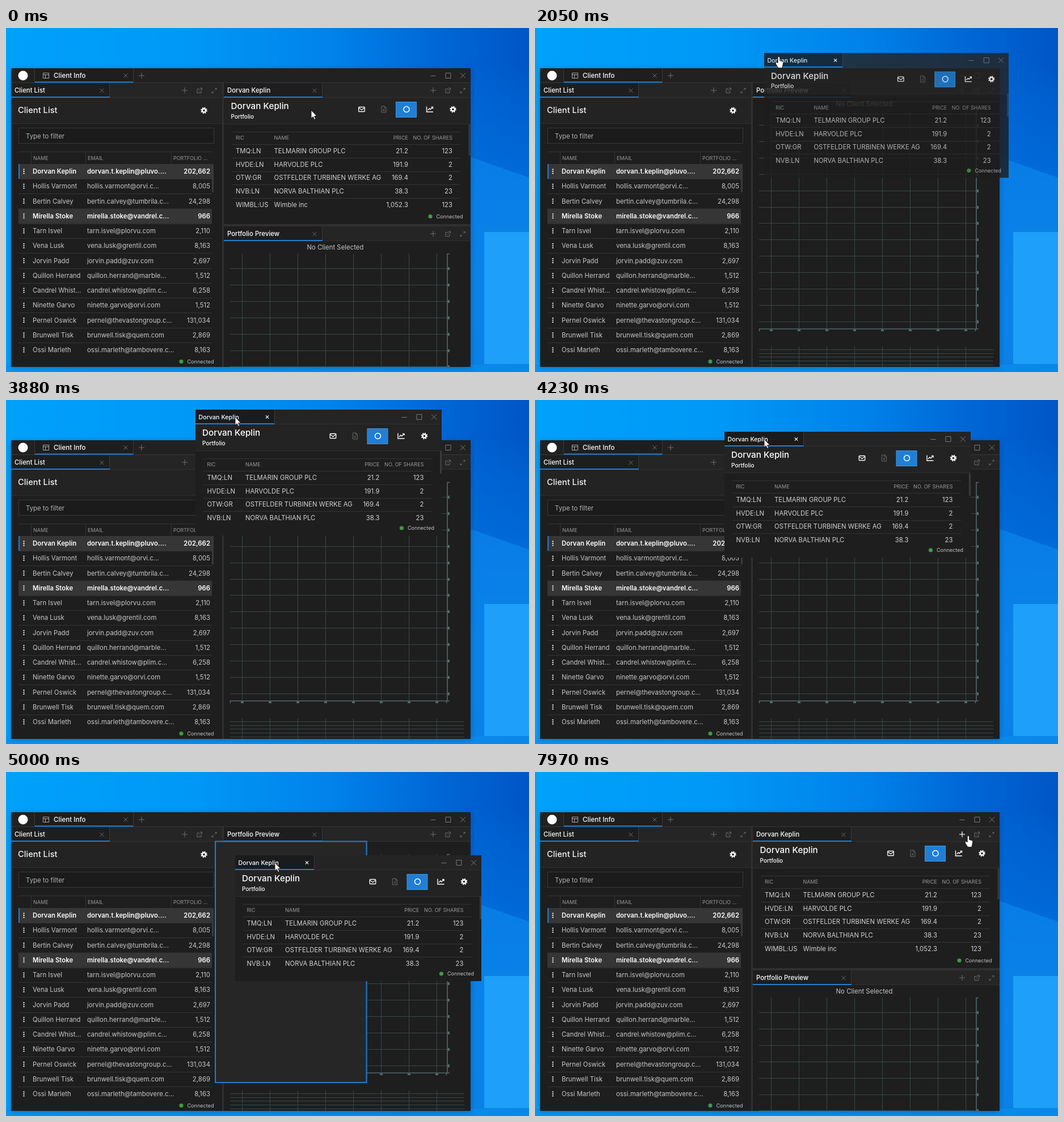
An HTML page that plays this animation: 922x607 px, repeating every 8 s.

```html
<!DOCTYPE html>
<html lang="en">
<head>
<meta charset="utf-8">
<title>Client desk</title>
<style>
  html, body { margin: 0; width: 100%; height: 100%; overflow: hidden; background: #0a84e4; }
  svg { display: block; width: 100vw; height: 100vh; }
  text { font-family: Inter, "Open Sans", sans-serif; letter-spacing: .05px; white-space: pre; }
</style>
</head>
<body>
<svg id="stage" viewBox="0 0 922 607" preserveAspectRatio="none"></svg>
<script>
const LOOP = 8000;
const BLUE = '#1f7fd6', BASE = '#1e1e1e', RAISED = '#232323', LINE = '#343434', DIM = '#6c6c6c';

const rect = (x, y, w, h, fill, extra = '') =>
  `<rect x="${x}" y="${y}" width="${w}" height="${h}" fill="${fill}" ${extra}/>`;
const path = (d, stroke, w = 1, extra = '') =>
  `<path d="${d}" fill="none" stroke="${stroke}" stroke-width="${w}" ${extra}/>`;
const hline = (x1, x2, y, color = LINE) => rect(x1, y, x2 - x1, 1, color);
const vline = (x, y1, y2, color = LINE) => rect(x, y1, 1, y2 - y1, color);
// y is the middle of the capitals
const text = (x, y, s, size = 11.3, fill = '#d2d2d2', weight = 400, anchor = 'start') =>
  `<text x="${x}" y="${(y + size * .36).toFixed(2)}" font-size="${size}" fill="${fill}" font-weight="${weight}" text-anchor="${anchor}">${s}</text>`;
const at = (x, y, s, extra = '') => `<g transform="translate(${x} ${y})" ${extra}>${s}</g>`;

// small icons, centred on the given point
const cross = (x, y, c = DIM, r = 3.5, w = 1) => at(x, y, path(`M${-r} ${-r}L${r} ${r}M${r} ${-r}L${-r} ${r}`, c, w));
const plus = (x, y, c = DIM, extra = '') => at(x, y, path('M-5 0H5M0 -5V5', c, 1.1), extra);
const popout = (x, y) => at(x, y, path('M0 -3H-4V4H3V0M-1 1L4 -4M1 -4.5H4.5V-1', DIM));
const expand = (x, y) => at(x, y, path('M1 -1L4 -4M1.5 -4H4V-1.5M-1 1L-4 4M-4 1.5V4H-1.5', DIM));
const winButtons = (x, y) => path(`M${x - 4.5} ${y + .5}h9M${x + 22} ${y - 4.5}h9v9h-9Z`, '#7a7a7a') + cross(x + 52.5, y, '#7a7a7a', 4.5);
const gear = (x, y) => at(x, y,
  '<circle r="3.1" fill="none" stroke="#fff" stroke-width="2.5"/>' +
  '<circle r="4.8" fill="none" stroke="#fff" stroke-width="1.9" stroke-dasharray="2 1.77"/>');
const mail = (x, y) => at(x, y,
  '<rect x="-5.3" y="-4" width="10.6" height="8" rx="1" fill="none" stroke="#fff" stroke-width="1.3"/>' + path('M-5 -2.5L0 1L5 -2.5', '#fff', 1.2));
const sheet = (x, y) => at(x, y, path('M-4 -5.5H1.5L4 -3V5.5H-4ZM1 -5.5V-2.5H4M-1.8 -.5L1.8 3.5M1.8 -.5L-1.8 3.5', '#666'));
const chart = (x, y) => at(x, y, path('M-5.5 -5V4.5H6M-3.5 1.5L-.5 -1.5L1.2 .2L5 -3.5M2.5 -4H5.5V-1', '#fff', 1.4));
const connected = (x, y) => `<circle cx="${x}" cy="${y}" r="3.6" fill="#3f9a42"/>` + text(x + 10.5, y, 'Connected', 9, '#c4c4c4');

const CLIENT = 'Dorvan Keplin';
const clients = [
  [CLIENT, 'dorvan.t.keplin@pluvo....', '202,662'],
  ['Hollis Varmont', 'hollis.varmont@orvi.c...', '8,005'],
  ['Bertin Calvey', 'bertin.calvey@tumbrila.c...', '24,298'],
  ['Mirella Stoke', 'mirella.stoke@vandrel.c...', '966'],
  ['Tarn Isvel', 'tarn.isvel@plorvu.com', '2,110'],
  ['Vena Lusk', 'vena.lusk@grentil.com', '8,163'],
  ['Jorvin Padd', 'jorvin.padd@zuv.com', '2,697'],
  ['Quillon Herrand', 'quillon.herrand@marble...', '1,512'],
  ['Candrel Whist...', 'candrel.whistow@plim.c...', '6,258'],
  ['Ninette Garvo', 'ninette.garvo@orvi.com', '1,512'],
  ['Pernel Oswick', 'pernel@thevastongroup.c...', '131,034'],
  ['Brunwell Tisk', 'brunwell.tisk@quem.com', '2,869'],
  ['Ossi Marleth', 'ossi.marleth@tambovere.c...', '8,163']
];
const holdings = [
  ['TMQ:LN', 'TELMARIN GROUP PLC', '21.2', '123'],
  ['HVDE:LN', 'HARVOLDE PLC', '191.9', '2'],
  ['OTW:GR', 'OSTFELDER TURBINEN WERKE AG', '169.4', '2'],
  ['NVB:LN', 'NORVA BALTHIAN PLC', '38.3', '23'],
  ['WIMBL:US', 'Wimble inc', '1,052.3', '123']
];

function desktop() {
  const stops = list => list.map(([o, c]) => `<stop offset="${o}" stop-color="${c}"/>`).join('');
  return `<defs>
    <linearGradient id="sky" x1="0" y1="0" x2="1" y2="0">${stops([[0, '#00a1fb'], [.35, '#0098f6'], [.62, '#0083ea'], [.85, '#0064d3'], [1, '#0056c6']])}</linearGradient>
    <linearGradient id="floor" x1="0" y1="0" x2="0" y2="1">${stops([[0, '#0078e0'], [.4, '#006fdc'], [.75, '#0a86ea'], [1, '#0a7ee0']])}</linearGradient>
    <linearGradient id="strip" x1="0" y1="0" x2="1" y2="0">${stops([[0, '#0a95f3'], [1, '#0a88ea']])}</linearGradient>
    <linearGradient id="fade" x1="0" y1="0" x2="0" y2="1"><stop offset=".1" stop-color="#fff" stop-opacity="0"/><stop offset=".5" stop-color="#fff"/></linearGradient>
    <mask id="low"><rect width="922" height="607" fill="url(#fade)"/></mask>
    <filter id="soft" x="-10%" y="-10%" width="120%" height="120%"><feGaussianBlur stdDeviation="5"/></filter>
    <clipPath id="mainClip"><rect x="9" y="71" width="810" height="527"/></clipPath>
    <clipPath id="floatClip"><rect width="434" height="222"/></clipPath>
  </defs>` +
    rect(0, 0, 922, 607, 'url(#sky)') +
    rect(780, 0, 142, 607, 'url(#floor)', 'mask="url(#low)"') +
    '<path d="M780 214L922 264V607H780Z" fill="#0a82e9" opacity=".8"/>' +
    rect(0, 594, 922, 13, 'url(#strip)') +
    rect(843, 360, 240, 233, '#1d9ffa') +
    rect(9, 73, 810, 526, '#00254d', 'opacity=".38" filter="url(#soft)"');
}

function panelHead(x, y, w, title, iconX, closeX) {
  return rect(x, y, w, 26, '#252525') + rect(x, y, 174, 26, BASE) +
    vline(x + 173, y, y + 26, '#3a3a3a') + hline(x, x + w, y + 25, '#303030') +
    rect(x, y + 24, 174, 2, BLUE) + text(x + 6, y + 13, title, 11.3, '#fff', 500) +
    cross(closeX, y + 13.5) + plus(iconX, y + 13) + popout(iconX + 26, y + 13.5) + expand(iconX + 52, y + 13.5);
}

function frame() {
  return rect(9, 71, 810, 527, BASE) + rect(9, 71, 810, 26, '#212121') +
    rect(51, 71, 173, 26, BASE) + vline(50, 71, 97, '#3a3a3a') + vline(224, 71, 97, '#3a3a3a') +
    hline(9, 819, 96, '#383838') + rect(51, 94.5, 173, 2, BLUE) +
    '<circle cx="30" cy="84" r="8.5" fill="#fff"/>' +
    path('M65.5 79.5h10v9h-10ZM65.5 82.5h10M69.5 82.5v6', '#aaa') +
    text(84, 84, 'Client Info', 11.5, '#fff', 500) + cross(211, 84) + plus(239, 84) + winButtons(753, 84);
}

function clientList() {
  let s = panelHead(9, 97, 372, 'Client List', 315, 169) +
    rect(9, 123, 372, 45, RAISED) + hline(9, 381, 168, '#303030') +
    text(21, 145, 'Client List', 14.6, '#f4f4f4', 500) + gear(349, 145.5) +
    rect(22.5, 176.5, 344, 27, '#1b1b1b', 'stroke="#383838"') + text(35, 190.5, 'Type to filter', 11.3, '#b4b4b4') +
    hline(22, 364, 218) + hline(22, 364, 240);
  [44, 140, 291].forEach(x => s += vline(x, 219, 240));
  s += text(48, 229.5, 'NAME', 9, '#999') + text(144, 229.5, 'EMAIL', 9, '#999') + text(295, 229.5, 'PORTFOLIO ...', 8.8, '#999');
  clients.forEach(([name, mailTo, sum], i) => {
    const y = 253 + i * 26.25, strong = i === 0 || i === 3;
    const c = strong ? '#fff' : '#c9c9c9', w = strong ? 600 : 400;
    if (strong) s += rect(22, y - 13, 341, 26, '#363636');
    if (i < 12) s += hline(22, 363, Math.round(y + 13));
    if (!i) s += rect(22, 240, 2, 26, BLUE);
    [-3.5, 0, 3.5].forEach(d => s += rect(30.5, y + d - 1, 2, 2, '#fff'));
    s += text(47, y, name, 11.3, c, w) + text(143, y, mailTo, 11.3, c, w) + text(360, y, sum, 11.3, c, w, 'end');
  });
  return s + rect(363, 240, 3, 50, '#3a3a3a') + connected(309, 588.5) + rect(381, 97, 3, 501, '#303030');
}

// shared by the docked panel and the floating window
function portfolio(h, rows, barH) {
  let s = rect(0, 26, 434, h - 26, BASE) + rect(0, 26, 434, 46, RAISED) + hline(0, 434, 72, '#303030') +
    text(12, 41, CLIENT, 15.2, '#fff', 500) + text(12, 59, 'Portfolio', 10, '#fff', 500) +
    mail(242.5, 46.5) + sheet(281.5, 46.5) + rect(303, 33.5, 36, 27, BLUE, 'stroke="#4795da"') +
    '<circle cx="321.5" cy="46.5" r="5" fill="none" stroke="#fff" stroke-width="1.5"/>' +
    chart(362.5, 46.5) + gear(403.5, 46.5) + hline(14, 417, 86) + hline(14, 417, 108) +
    text(20.5, 97, 'RIC', 9, '#999') + text(88, 97, 'NAME', 9, '#999') +
    text(324.5, 97, 'PRICE', 9, '#999', 400, 'end') + text(402.5, 97, 'NO. OF SHARES', 9, '#999', 400, 'end');
  holdings.slice(0, rows).forEach(([ric, name, price, n], i) => {
    const y = 120 + i * 23.7;
    s += text(20.5, y, ric) + text(88, y, name) +
      text(324.5, y, price, 11.3, '#d2d2d2', 400, 'end') + text(402.5, y, n, 11.3, '#d2d2d2', 400, 'end');
    if (i < rows - 1) s += hline(14, 417, Math.round(y + 12));
  });
  return s + rect(431, 73, 3, barH, '#3a3a3a') + connected(363.5, h === 222 ? 209 : 235.5);
}

function preview() {
  const grid = '#394747', axis = '#52686c';
  const cols = Array.from({ length: 8 }, (_, i) => 416 + i * 49);
  const rows = Array.from({ length: 13 }, (_, i) => Math.round(424 + i * 28.9));
  let s = rect(384, 350, 435, 501, BASE) + panelHead(384, 350, 435, 'Portfolio Preview', 753, 544) +
    text(580.5, 386.5, 'No Client Selected', 11.3, '#c6c6c6', 400, 'middle');
  cols.forEach(x => s += vline(x, 398, 785, grid) + rect(x - 2, 785, 5, 3, axis) + vline(x, 815, 851, grid));
  rows.forEach(y => s += hline(395, 777, y, grid) + rect(779, y - 2, 3, 5, axis));
  for (let i = 0; i < 5; i++) s += hline(395, 808, 820 + Math.round(i * 6.7), grid);
  return s + path('M782 398.5H778V784H782M395.5 788V784H776.5V788', axis, 1.6);
}

function floating() {
  return rect(0, 0, 434, 26, '#242424') + rect(0, 0, 139, 26, '#1a1b1c') + hline(0, 434, 25, '#303030') +
    portfolio(222, 4, 40) + vline(139, 0, 26, '#3a3a3a') + rect(0, 24, 139, 2, BLUE) +
    text(5.5, 13.5, CLIENT, 10.6, '#fff', 500) + cross(126.5, 13, '#fff', 2.6, 1.2) + winButtons(368, 13);
}

const stage = document.getElementById('stage');
stage.innerHTML = desktop() +
  `<g clip-path="url(#mainClip)">${frame()}${clientList()}
    <g id="dock">${at(384.5, 97, portfolio(250, 5, 55))}${panelHead(384, 97, 435, CLIENT, 753, 544)}${rect(384, 346, 435, 4, '#303030')}
      ${plus(753, 110, '#fff', 'id="hot"')}</g>
    <g id="preview">${preview()}</g></g>
  <rect id="zone" fill="#262626" stroke="${BLUE}" stroke-width="2"/>
  <g id="float" clip-path="url(#floatClip)">${floating()}</g>
  <g id="cursor" stroke="#111" stroke-width=".9" stroke-linejoin="round" fill="#fff">
    <path id="arrow" d="M0 0V14.5L3.3 11.5L5.6 16.5L7.8 15.5L5.6 10.6H10Z"/>
    <path id="hand" d="M-1.8 10.5V1.2a1.7 1.7 0 0 1 3.4 0V6.5L6 7.6Q8 8.2 7.8 10L7 14.5L5.8 19.5H-1L-5.2 13Q-6.8 10.2 -4.5 9.5Z"/>
  </g>`;

// time, then values; straight moves between entries
const winPath = [[1290, 386, 97], [1990, 404, 48], [2050, 404, 44], [2680, 340, 21], [3080, 340, 21], [3150, 344, 30],
  [3350, 334, 17], [3880, 334, 17], [4230, 334, 56], [4650, 311, 114], [4720, 330, 121], [5000, 404, 147], [5490, 437, 163], [5700, 444, 166]];
const pointerPath = [[190, 538, 145], [950, 469, 101], [1220, 469, 101], [1640, 431, 80], [1990, 431, 54], [2050, 430, 51],
  [2680, 368, 31], [3080, 368, 31], [3350, 404, 30]];
const lastMove = [[6570, 514, 180], [7340, 662, 106], [7970, 764, 113]];
const zonePath = [[4720, 83, 97, 381, 598], [4860, 330, 118, 600, 570], [5000, 369, 122.5, 635, 548],
  [5210, 385, 124.5, 760, 520], [5490, 385, 124.5, 817.5, 462], [5630, 385, 124.5, 817.5, 360]];
// scale and opacity of the window while it is torn off
const tearPath = [[2060, .993, .84], [2200, 1, 1]];

function along(keys, t) {
  const i = keys.findIndex(k => k[0] > t);
  if (i === 0) return keys[0].slice(1);
  if (i < 0) return keys[keys.length - 1].slice(1);
  const a = keys[i - 1], b = keys[i], p = (t - a[0]) / (b[0] - a[0]);
  return a.slice(1).map((v, n) => v + (b[n + 1] - v) * p);
}

const el = Object.fromEntries(['dock', 'hot', 'preview', 'zone', 'float', 'cursor', 'arrow', 'hand']
  .map(id => [id, document.getElementById(id)]));
const show = (node, on) => node.style.display = on ? '' : 'none';
const place = (node, x, y, scale = 1) =>
  node.setAttribute('transform', `translate(${x.toFixed(2)} ${y.toFixed(2)}) scale(${scale})`);

function draw(t) {
  const out = t >= 1290 && t < 6100;
  const [wx, wy] = along(winPath, t).map(Math.round);
  const [scale, opacity] = along(tearPath, t);
  show(el.dock, !out);
  show(el.float, out);
  place(el.preview, 0, out ? -253 : 0);
  place(el.float, wx, wy, scale);
  el.float.setAttribute('opacity', opacity);

  show(el.zone, t >= 4720 && t < 6100);
  const [x1, y1, x2, y2] = along(zonePath, t);
  Object.entries({ x: x1, y: y1, width: x2 - x1, height: y2 - y1 }).forEach(([k, v]) => el.zone.setAttribute(k, v));

  let [cx, cy] = along(t < 6100 ? pointerPath : lastMove, t);
  if (t >= 3880 && t < 6100) [cx, cy] = [wx + 70, wy + 13];
  const overPlus = t > 7410 && cx > 744;
  const hand = overPlus || (t > 190 && t < 3220 && cy < 122);
  show(el.hot, overPlus);
  show(el.hand, hand);
  show(el.arrow, !hand);
  place(el.cursor, cx, cy);
}

const start = performance.now();
function tick() {
  draw((performance.now() - start) % LOOP);
  requestAnimationFrame(tick);
}
draw(0);
requestAnimationFrame(tick);
</script>
</body>
</html>
```
